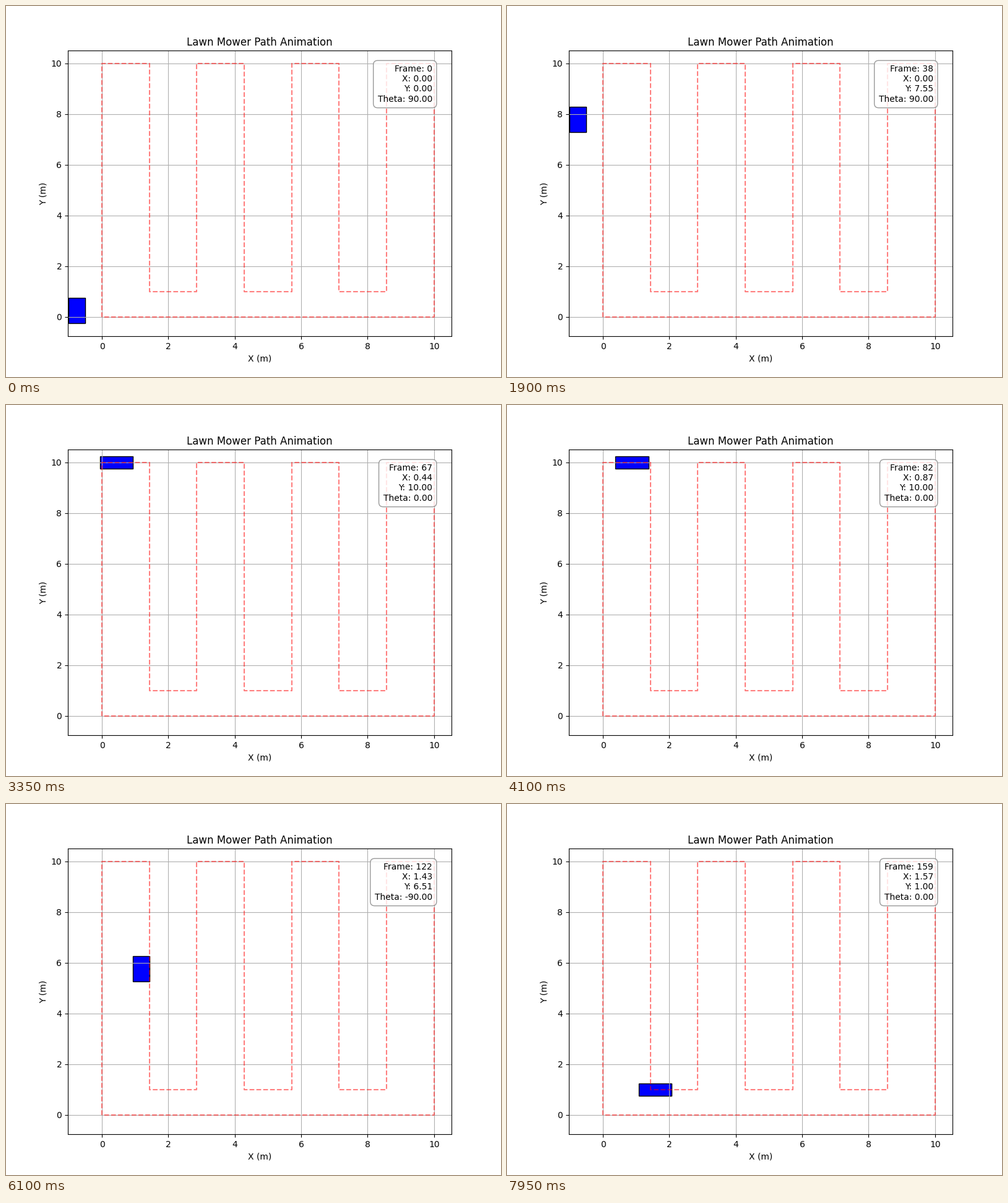
Animation, 800 px wide and 600 px high, one loop 8 s. Source, as a matplotlib script:

```python
import numpy as np
import matplotlib.pyplot as plt
from matplotlib.animation import FuncAnimation
from matplotlib.patches import Rectangle

FRAMES, INTERVAL = 160, 50
STEPS = 50                 # samples per straight run
LENGTH, WIDTH = 1.0, 0.5   # mower size in metres
LANES = 8


def lawn_path():
    """Corners of the closed mowing route."""
    points = [(0, 0)]
    for k, x in enumerate(np.linspace(0, 10, LANES)):
        ends = [(x, 1), (x, 10)] if k % 2 == 0 else [(x, 10), (x, 1)]
        points += ends if k else [(x, 10)]
    return np.array(points + [(10, 0), (0, 0)], dtype=float)


def pose(frame):
    """Position and heading: each run pauses one frame at its start."""
    run, step = divmod(frame, STEPS + 1)
    start, end = path[run], path[run + 1]
    delta = end - start
    x, y = start + delta * max(step - 1, 0) / (STEPS - 1)
    return x, y, np.degrees(np.arctan2(delta[1], delta[0]))


path = lawn_path()

fig, ax = plt.subplots(figsize=(8, 6), dpi=100)
ax.plot(path[:, 0], path[:, 1], "r--", alpha=0.5)
mower = Rectangle((-LENGTH / 2, -WIDTH / 2), LENGTH, WIDTH, fc="blue", ec="black")
ax.add_patch(mower)
ax.set_xlim(-1.025, 10.525)
ax.set_ylim(-0.7625, 10.5125)
ax.set_xlabel("X (m)")
ax.set_ylabel("Y (m)")
ax.set_title("Lawn Mower Path Animation")
ax.grid(True)
info = ax.text(0.95, 0.95, "", transform=ax.transAxes, ha="right", va="top",
               fontsize=10,
               bbox=dict(boxstyle="round,pad=0.5", fc="white", ec="gray", alpha=0.8))


def update(frame):
    x, y, theta = pose(frame)
    mower.set_xy((x - LENGTH / 2, y - WIDTH / 2))
    mower.set_angle(theta)
    info.set_text(f"Frame: {frame}\nX: {x:.2f}\nY: {y:.2f}\nTheta: {theta:.2f}")
    return mower, info


anim = FuncAnimation(fig, update, frames=FRAMES, interval=INTERVAL, repeat=True)
plt.show()
```
